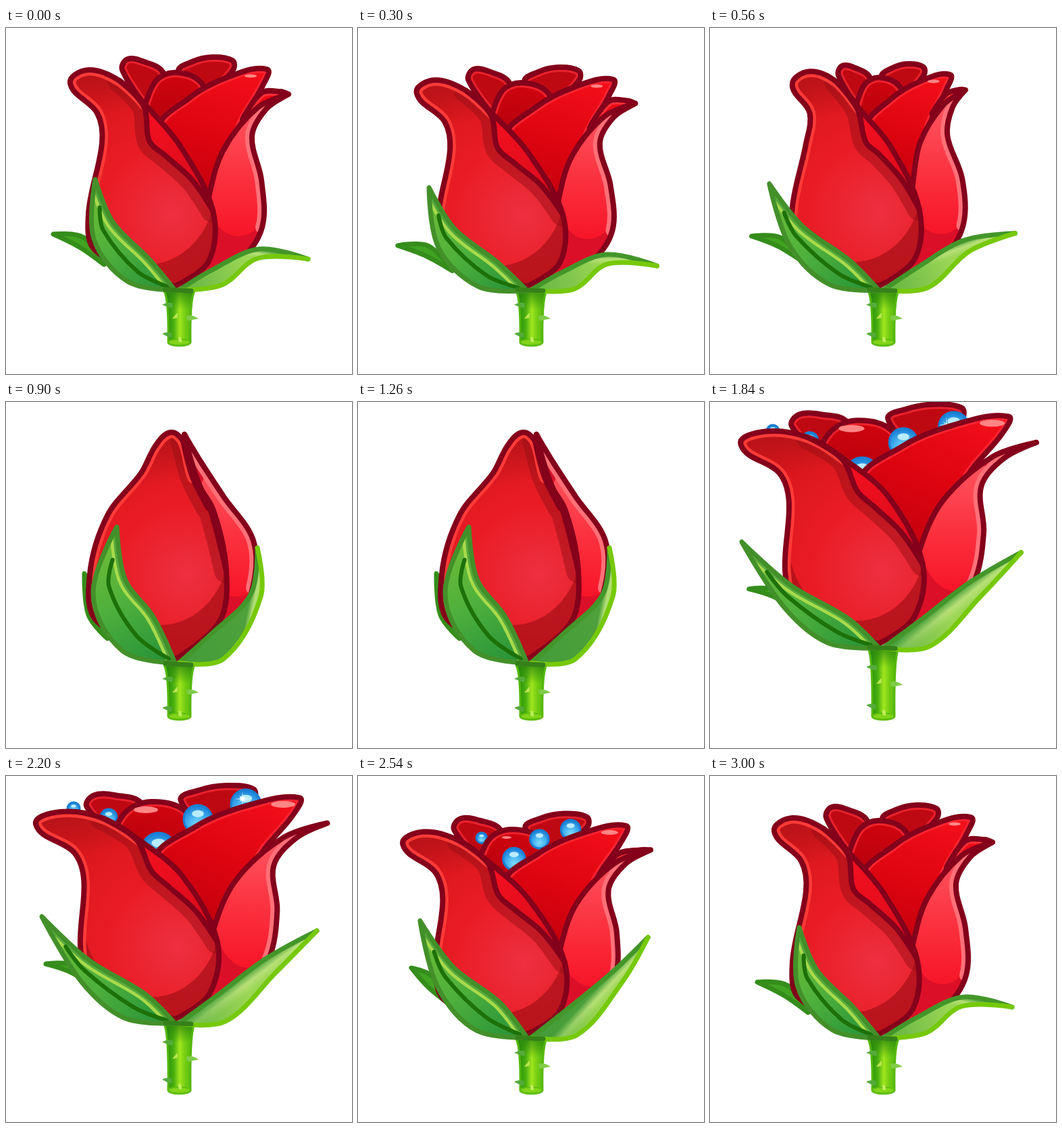
An HTML page with a canvas for the animation above (3.02 s loop, 512x512 px).

```html
<!DOCTYPE html>
<html lang="en">
<head>
<meta charset="utf-8">
<title>Rose</title>
<style>
html, body { margin: 0; width: 100%; height: 100%; overflow: hidden; background: #fff; }
canvas { display: block; }
</style>
</head>
<body>
<canvas id="stage" width="512" height="512"></canvas>
<script>
const ctx = document.getElementById('stage').getContext('2d');
const LOOP = 3020, DARK = '#84001b';
const AXIS = 256, BASE = 388;

// The whole motion: a few quantities over time.
const NAMES = ['bud', 'open', 'rise', 'squash', 'leafBud', 'leafOpen', 'dew'];
const KEYS = [
  [0, 0, 0, 0, 0, 0, 0, 0],
  [330, 0, 0, 0, 1.1, 0, .1, 0],
  [600, .3, 0, 0, .5, 0, .55, 0],
  [880, 1, 0, 0, 0, 1, 1, 0],
  [1300, 1, .85, 0, 0, 1, 1, 0],
  [1560, .35, .85, .45, 0, .42, 1, .45],
  [1800, 0, 1.06, 1.1, -1.1, 0, 1.06, 1.05],
  [2020, 0, 1.06, 1.1, -1.1, 0, 1.05, 1.05],
  [2200, 0, 1, 1, -.5, 0, 1, 1],
  [2540, 0, .4, 0, .9, .35, 1, .65],
  [3000, 0, 0, 0, 0, 0, 0, 0]];

const points = s => s.split(' ').map(p => p.split(',').map(Number));
const petal = (rest, bud, slide = 0) => ({ rest: points(rest), bud: bud && points(bud), slide });
const leaf = (rest, bud, open) => ({ rest: points(rest), bud: points(bud), open: points(open) });

const front = petal(
  '250,382 133,330 122,275 142,170 135,126 95,82 122,62 168,78 210,118 258,175 306,270 300,345',
  '252,380 135,325 124,255 150,168 200,105 221,65 243,45 262,58 277,112 306,158 326,250 316,325');
const right = petal(
  '418,98 372,118 322,180 300,250 275,385 345,345 379,295 378,225 364,160 385,120',
  '264,48 272,80 285,120 305,170 275,378 335,335 365,275 366,205 322,140 288,88');
const middle = petal('310,300 225,155 272,103 330,72 386,61 380,85 345,150');
const centre = petal('204,120 222,78 250,66 288,80 295,115 238,150', null, -38);
const backLeft = petal('210,120 172,62 180,46 205,50 232,65 235,100', null, -28);
const backRight = petal('255,65 275,50 305,43 335,48 336,62 290,110');
// Leaves: tip, two points on one edge, base, two on the other.
const leafRight = leaf(
  '447,342 375,327 305,358 256,388 320,380 372,341',
  '372,216 362,285 305,342 256,386 322,380 377,288',
  '460,251 385,292 312,347 256,388 325,385 400,312');
const leafLeft = leaf(
  '132,224 130,312 180,375 250,388 212,342 158,287',
  '164,185 129,285 172,368 250,386 218,318 176,262',
  '53,230 112,327 175,380 250,388 205,344 122,294');
const leafBack = leaf(
  '70,305 115,310 145,350 110,325',
  '116,254 127,285 150,350 122,315',
  '59,300 100,302 135,337 95,312');
const dropsBehind = points('100,48,9 152,61,12 355,42,22');
const dropsInside = points('284,64,21 226,109,25');

const mix = (a, b, k) => a + (b - a) * k;
const blend = (p, q, k) => p.map((v, i) => mix(v, q[i], k));
const shift = ([x, y], dx, dy) => [x + dx, y + dy];
const clamp = v => Math.min(1, Math.max(0, v));

// Monotone cubic interpolation of one quantity through the keys.
function sample(t, col) {
  const value = k => KEYS[k][col], time = k => KEYS[k][0], last = KEYS.length - 1;
  const slope = k => k < 0 || k >= last ? 0 : (value(k + 1) - value(k)) / (time(k + 1) - time(k));
  const tangent = k => {
    const l = slope(k - 1), r = slope(k);
    return l * r > 0 ? 2 * l * r / (l + r) : 0;
  };
  let i = 0;
  while (i < last - 1 && t >= time(i + 1)) i++;
  const h = time(i + 1) - time(i), u = clamp((t - time(i)) / h), v = 1 - u;
  return v * v * (1 + 2 * u) * value(i) + u * u * (3 - 2 * u) * value(i + 1) +
    h * u * v * (v * tangent(i) - u * tangent(i + 1));
}

// Petals spread more the higher they are; without a bud shape they gather at the tip.
function posePetal({ rest, bud, slide }, s) {
  return rest.map(([x, y], i) => {
    const h = clamp((BASE - y) / 320), droop = h * clamp((AXIS - x) / 134);
    const spread = 1 + s.open * .34 * h * h * (3 - 2 * h);
    const bloom = [
      AXIS + (x - AXIS) * spread + slide * s.open - 8 * s.squash * h,
      y + 20 * s.open * droop + 14 * s.squash * h];
    const closed = bud ? bud[i] : [mix(x, 266, .96), mix(y, 75, .5)];
    return shift(blend(bloom, closed, s.bud), 0, -22 * s.rise);
  });
}

function poseLeaf({ rest, bud, open }, s) {
  const sag = s.squash * (1 - s.leafOpen);
  return rest.map((p, i) => {
    const dx = -40 * sag * (BASE - p[1]) / 320, dy = 18 * sag * Math.abs(p[0] - AXIS) / 190;
    const bent = blend(blend(p, open[i], s.leafOpen), bud[i], s.leafBud);
    return shift(bent, dx, dy - 22 * s.rise);
  });
}

// Smooth path from one point index to another, wrapping round.
function spline(pts, corners = [], from = 0, to = pts.length) {
  const n = pts.length, at = i => pts[(i + n) % n], path = new Path2D();
  const handle = (i, len) => {
    const [x, y] = at(i);
    if (corners.includes(i % n)) return [x, y];
    const dx = at(i + 1)[0] - at(i - 1)[0], dy = at(i + 1)[1] - at(i - 1)[1];
    const k = len / (Math.hypot(dx, dy) || 1);
    return [x + dx * k, y + dy * k];
  };
  path.moveTo(...at(from));
  for (let i = from; i < to; i++) {
    const a = at(i), b = at(i + 1), len = Math.hypot(b[0] - a[0], b[1] - a[1]) / 3;
    path.bezierCurveTo(...handle(i, len), ...handle(i + 1, -len), ...b);
  }
  if (to - from === n) path.closePath();
  return path;
}

const line = pts => spline(pts, [0, pts.length - 1], 0, pts.length - 1);

function stroke(path, color, width) {
  ctx.strokeStyle = color;
  ctx.lineWidth = width;
  ctx.stroke(path);
}

function fill(path, color, rule = 'nonzero') {
  ctx.fillStyle = color;
  ctx.fill(path, rule);
}

function flood(color) {
  ctx.fillStyle = color;
  ctx.fillRect(0, 0, 512, 512);
}

function shade(gradient, colors) {
  colors.forEach((c, i) => gradient.addColorStop(i / (colors.length - 1), c));
  return gradient;
}
const linear = (a, b, ...colors) => shade(ctx.createLinearGradient(...a, ...b), colors);
const radial = (x, y, r, ...colors) => shade(ctx.createRadialGradient(x, y, 0, x, y, r), colors);

function within(path, draw) {
  ctx.save();
  ctx.clip(path);
  draw();
  ctx.restore();
}

function oval(x, y, rx, ry, end = 2 * Math.PI) {
  const path = new Path2D();
  path.ellipse(x, y, rx, ry, 0, 0, end);
  return path;
}

function innerPetal(pts, corners, paint, light) {
  const path = spline(pts, corners);
  fill(path, paint);
  within(path, () => stroke(path, light, 14));
  stroke(path, DARK, 8);
}

// Dew sinks into the flower and shrinks as it closes.
function drop([x0, y0, r0], dew) {
  const x = mix(240, x0, dew), y = mix(148, y0, dew), r = r0 * Math.min(dew, 1);
  if (r < 1) return;
  const body = oval(x, y, r, r);
  fill(body, radial(x, y + r * .4, r * 1.3, '#7fdcff', '#48b4f2', '#1c83d8'));
  stroke(body, '#1a7fd4', 3);
  fill(oval(x, y - r * .4, r * .42, r * .25), '#b9ecff');
}

function sparkle(x, y, r) {
  const star = new Path2D();
  for (let i = 0; i < 16; i++) {
    const d = i % 2 ? r * .16 : i % 4 ? r * .6 : r, a = i * Math.PI / 8;
    star.lineTo(x + d * Math.cos(a), y + d * Math.sin(a));
  }
  fill(star, '#fff');
}

function gloss([x, y], size) {
  if (size > .1) fill(oval(x, y, 18 * size, 5 * size), '#ff8585');
}

function thorn(x, y, dx, dy, color) {
  const spike = new Path2D();
  spike.moveTo(x + dx, y + dy);
  spike.quadraticCurveTo(x + dy * .7, y - 6, x - dx * .6, y - 3);
  spike.quadraticCurveTo(x - dx * .7, y + 4, x - dx * .3, y + 4);
  fill(spike, color);
}

function stem(top) {
  const path = new Path2D(), y = part => mix(top, 466, part);
  path.moveTo(234, top);
  path.quadraticCurveTo(241, top + 14, 240, 465);
  path.ellipse(256.5, 465, 16.5, 5, 0, Math.PI, 0, true);
  path.quadraticCurveTo(272, top + 14, 279, top);
  path.closePath();
  fill(path, linear([240, 0], [274, 0], '#2f960c', '#4bb010', '#a0e61e', '#72cc12', '#58ba12'));
  within(path, () => flood(linear([0, top], [0, top + 28], '#2b860ccc', '#2b860c00')));
  stroke(path, '#55b80b', 3);
  const foot = oval(256.5, 465, 16, 4.5);
  fill(foot, '#83d51a');
  stroke(foot, '#5fbe0d', 2);
  thorn(241, y(.28), -10, -1, '#55aa3c');
  thorn(251, y(.47), -5, 5, '#b8e650');
  thorn(274, y(.52), 11, 1, '#7fcc48');
  thorn(240, y(.85), -9, -2, '#55aa3c');
  thorn(257, y(.93), 3, 5, '#c2ee5a');
}

function rightPetal(p, curl) {
  const tip = p[0], bend = p[1];
  innerPetal([shift(bend, -22 * curl, 17 * curl), shift(bend, 6 * curl, -22 * curl),
    shift(blend(bend, tip, .7), 2, -10 * curl), tip], [0, 3], '#ef0a16', '#ff3038');
  const path = spline(p, [0, 4]);
  fill(path, '#dc0f28');
  within(path, () => {
    const bottom = p[6][1] + 13, cx = (p[3][0] + p[7][0]) / 2 + 5;
    fill(oval(cx, bottom - 110, 60, 110),
      linear([cx, bottom - 190], [cx, bottom], '#ff5560', '#fb3340', '#f71528'));
    stroke(spline(p, [0, 4], 6, 10), '#ff7078', 20);
  });
  stroke(path, DARK, 8);
}

// The turned lip lies between the outer edge and a crease that swings away from it.
function frontPetal(p, lipSize) {
  const path = spline(p, [0]);
  const off = (q, dx, dy) => shift(q, dx * lipSize, dy * lipSize);
  const crease = line([p[7], off(p[8], -6, -2), off(p[9], -46, -8), off(p[9], -22, 14),
    off(blend(p[9], p[10], .5), -7, 2), p[10]]);
  const cx = p[10][0] - 97, cy = p[11][1] - 115;
  fill(path, radial(cx + 38, cy + 45, 210, '#ee3040', '#e91c25', '#d9161c'));
  within(path, () => {
    const low = new Path2D();
    low.rect(0, cy, 512, 300);
    low.addPath(oval(cx, cy, 102, 120, Math.PI));
    fill(low, '#a50f18b0', 'evenodd');
    flood(linear(p[6], shift(p[6], 15, 70), '#96101590', '#96101500'));
    stroke(crease, '#9a0f1680', 36);
    stroke(spline(p, [0], 1, 8), '#ff3b38', 17);
    const lip = new Path2D(crease);
    [10, 9, 8, 7].forEach(i => lip.lineTo(p[i][0] + 30, p[i][1] - 10));
    fill(lip, linear(p[8], p[10], '#f5101f', '#d40a1a'));
  });
  stroke(path, DARK, 8);
  stroke(crease, DARK, 8);
}

function leftLeaf(p) {
  const path = spline(p, [0, 3]), inner = spline(p, [0, 3], 3, 6);
  const a = blend(p[1], p[5], .5), b = blend(p[2], p[4], .45);
  fill(path, linear(p[0], p[3], '#72bd35', '#4eb03c', '#249039'));
  within(path, () => {
    stroke(inner, '#a8da4b', 22);
    stroke(inner, '#57aa3d', 13);
  });
  stroke(line([blend(p[0], a, .55), a, b, blend(b, p[3], .85)]), '#1d7109', 6);
  stroke(path, '#43902a', 7);
}

function rightLeaf(p) {
  const path = spline(p, [0, 3]);
  fill(path, linear(p[1], p[5], '#4da03c', '#b8e078', '#9bd655'));
  within(path, () => flood(radial(...p[3], 110, '#3b9a3599', '#3b9a3500')));
  stroke(spline(p, [0, 3], 0, 3), '#43962a', 7);
  stroke(spline(p, [0, 3], 3, 6), '#76c90a', 7);
}

function draw(now) {
  const t = now % LOOP, s = {};
  NAMES.forEach((name, i) => s[name] = sample(t, i + 1));
  flood('#fff');
  ctx.lineJoin = ctx.lineCap = 'round';

  const behind = spline(poseLeaf(leafBack, s), [0, 2]);
  fill(behind, '#42a322');
  stroke(behind, '#358d1b', 7);

  const [outer, left, far] = dropsBehind;
  drop(outer, s.dew);
  innerPetal(posePetal(backLeft, s), [0], '#bf0912', '#e8222c');
  innerPetal(posePetal(backRight, s), [5], '#bf0912', '#e8222c');
  drop(left, s.dew);
  drop(far, s.dew);
  if (s.dew > .7) sparkle(far[0] - 5, far[1] - 8, 12 * clamp(s.dew));

  const c = posePetal(centre, s), m = posePetal(middle, s);
  innerPetal(c, [0, 5], linear(c[2], c[5], '#d0040f', '#b5020c'), '#ee222b');
  gloss(shift(c[2], -7, 12), s.open);
  dropsInside.forEach(d => drop(d, s.dew));
  innerPetal(m, [0], linear(m[4], m[0], '#f5101a', '#dc0410', '#b8000c'), '#fa2430');
  gloss(shift(m[4], -24, 10), .5 + s.open / 2);
  rightPetal(posePetal(right, s), Math.max(0, (1 - s.bud) * (1 - s.open)));
  frontPetal(posePetal(front, s), 1 - .85 * s.bud);

  const top = BASE - 22 * s.rise;
  stem(top + 1);
  rightLeaf(poseLeaf(leafRight, s));
  leftLeaf(poseLeaf(leafLeft, s));
  stroke(line([[236, top - 1], [256, top], [274, top + 1]]), '#36801a', 7);
}

function frame() {
  draw(performance.now());
  requestAnimationFrame(frame);
}
frame();
</script>
</body>
</html>
```
